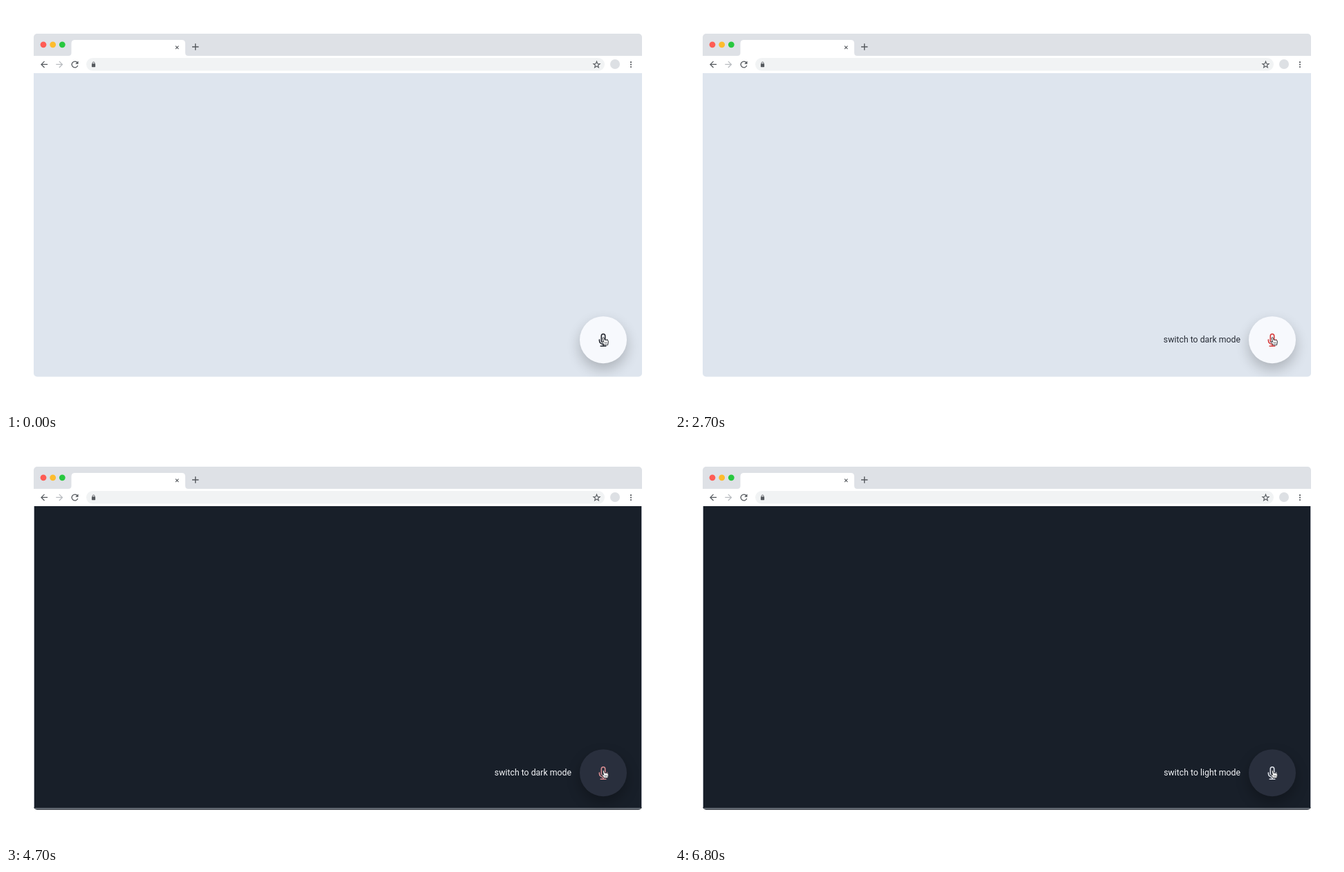
Recreate the animation shown at these times as an HTML page. Size 958 px wide and 585 px high, loop 7.4 s.

```html
<!DOCTYPE html>
<html lang="en">
<head>
<meta charset="utf-8">
<title>Voice theme switch</title>
<style>
  html, body { margin: 0; width: 100%; height: 100%; overflow: hidden; background: #fff; }
  svg { display: block; width: 100vw; height: 100vh; }
  text { font: 12.3px Roboto, sans-serif; text-anchor: end; }
  .line { fill: none; stroke-linecap: round; stroke-linejoin: round; }
</style>
</head>
<body>
<svg viewBox="0 0 958 585">
  <defs>
    <clipPath id="window"><rect x="40" y="40" width="879" height="495.4" rx="5"/></clipPath>
    <filter id="blur" x="-60%" y="-60%" width="220%" height="220%"><feGaussianBlur stdDeviation="9.5"/></filter>
    <path id="arrow" d="M20 11H7.83l5.59-5.59L12 4l-8 8 8 8 1.41-1.41L7.83 13H20z"/>
  </defs>

  <g clip-path="url(#window)">
    <g id="page">
      <rect id="back" x="40" y="90" width="879" height="446"/>
      <g id="edge">
        <path d="M40.4 97V532M918.6 97V532" stroke="#dfe3e8" stroke-width=".9"/>
        <path d="M42 533.6H917" stroke="#9da3ab" stroke-width="1"/>
      </g>
      <circle id="shadow" cx="863" cy="491" r="34" filter="url(#blur)"/>
      <circle id="button" cx="863" cy="482.2" r="34"/>
    </g>

    <rect x="40" y="40" width="879" height="32" fill="#dee1e6"/>
    <rect x="40" y="72" width="879" height="25" fill="#fff"/>
    <path d="M90 72q4.5 0 4.5-4.5V54q0-5 5-5H254q5 0 5 5V67.5q0 4.5 4.5 4.5z" fill="#fff"/>
    <circle cx="54" cy="55.8" r="4.4" fill="#ff5c54"/>
    <circle cx="67.7" cy="55.8" r="4.4" fill="#fdbc2e"/>
    <circle cx="81.3" cy="55.8" r="4.4" fill="#28c83f"/>
    <path d="M245 57.7l4.4 4.4M249.4 57.7l-4.4 4.4" stroke="#55595e" stroke-width="1.1"/>
    <path d="M269 59H278.4M273.7 54.3V63.7" stroke="#55595e" stroke-width="1.4"/>

    <rect x="116" y="75" width="749" height="18.6" rx="9.3" fill="#f1f3f4"/>
    <g fill="#55595e">
      <use href="#arrow" transform="translate(47.6 76.9) scale(.625)"/>
      <use href="#arrow" transform="translate(84.8 76.9) scale(-.625 .625)" fill="#b9bcc0"/>
      <path transform="translate(92 76.9) scale(.625)" d="M17.65 6.35A8 8 0 1 0 19.73 14H17.65A6 6 0 1 1 16.22 7.78L13 11H20V4z"/>
      <rect x="123.9" y="83.3" width="5.2" height="4.9" rx=".6"/>
      <path class="line" d="M125 83.5v-1.1a1.5 1.5 0 0 1 3 0v1.1" stroke="#55595e" stroke-width=".9"/>
      <circle cx="903" cy="81.2" r="1.1"/>
      <circle cx="903" cy="84.6" r="1.1"/>
      <circle cx="903" cy="88" r="1.1"/>
    </g>
    <polygon id="star" fill="none" stroke="#55595e" stroke-width="1.1"/>
    <circle cx="880" cy="84" r="7" fill="#dde0e4"/>
  </g>

  <text id="words" x="817" y="486.3"></text>
  <g id="mic" class="line" stroke-width="1.6">
    <rect x="860.3" y="473.8" width="5.4" height="12" rx="2.7"/>
    <path d="M857.4 482v1.2a5.6 5.4 0 0 0 11.2 0V482M863 488.7V491.2M859.2 491.3H866.8"/>
  </g>
  <g class="line" stroke="#23262c">
    <path d="M862.2 479.2q1-1.4 2 0l1 3.4q.9-.9 1.7.1 1-.7 1.7.2 1.2-.4 1.6.8.6 2.6-.3 4.4l-.3 1.6h-5.2q-1.4-2.2-3.6-4.6-.2-1.6 2.6.1z" fill="#fff" stroke-width=".9" style="fill:#fff"/>
    <path d="M865.4 485.6v2.2M866.9 485.6v2.2M868.4 485.6v2.2" stroke-width=".5"/>
  </g>
</svg>
<script>
  const LOOP = 7400;
  const el = id => document.getElementById(id);
  const set = (id, name, value) => el(id).setAttribute(name, value);

  const themes = {
    light: { page: "#dee5ee", button: "#f7f9fd", shade: 0.22, mic: [35, 39, 47], text: "#272c36" },
    dark: { page: "#181f29", button: "#292f3d", shade: 0.28, mic: [222, 226, 233], text: "#f3f5f8" }
  };
  const red = [214, 58, 58];

  const phrases = [
    [0, ""],
    [1700, "it's too dark"],
    [2300, "switch to dark mode"],
    [5200, "switch"],
    [5500, "switch to"],
    [6000, "switch to light"],
    [6500, "switch to light mode"]
  ];
  // Start and end of each listening period
  const listening = [[500, 3500], [4700, 6800]];

  const points = Array.from({ length: 10 }, (_, i) => {
    const r = i % 2 ? 2.1 : 4.9, a = i * Math.PI / 5;
    return [853.5 + r * Math.sin(a), 84.9 - r * Math.cos(a)].map(n => n.toFixed(2));
  });
  set("star", "points", points.join(" "));

  function heat(t) {
    const span = listening.find(([from, to]) => t >= from && t < to);
    return !span ? 0 : t < span[0] + 100 ? 0.5 : 1;
  }

  function draw(t) {
    const dark = t >= 3900;
    const theme = dark ? themes.dark : themes.light;
    const k = heat(t);
    const mic = theme.mic.map((c, i) => Math.round(c + (red[i] - c) * k));
    set("back", "fill", theme.page);
    set("edge", "visibility", dark ? "visible" : "hidden");
    set("button", "fill", theme.button);
    set("shadow", "opacity", theme.shade);
    set("mic", "stroke", `rgb(${mic})`);
    set("words", "fill", theme.text);
    el("words").textContent = phrases.filter(([at]) => at <= t).pop()[1];
  }

  const start = performance.now();
  function tick() {
    draw((performance.now() - start) % LOOP);
    requestAnimationFrame(tick);
  }
  tick();
</script>
</body>
</html>
```
